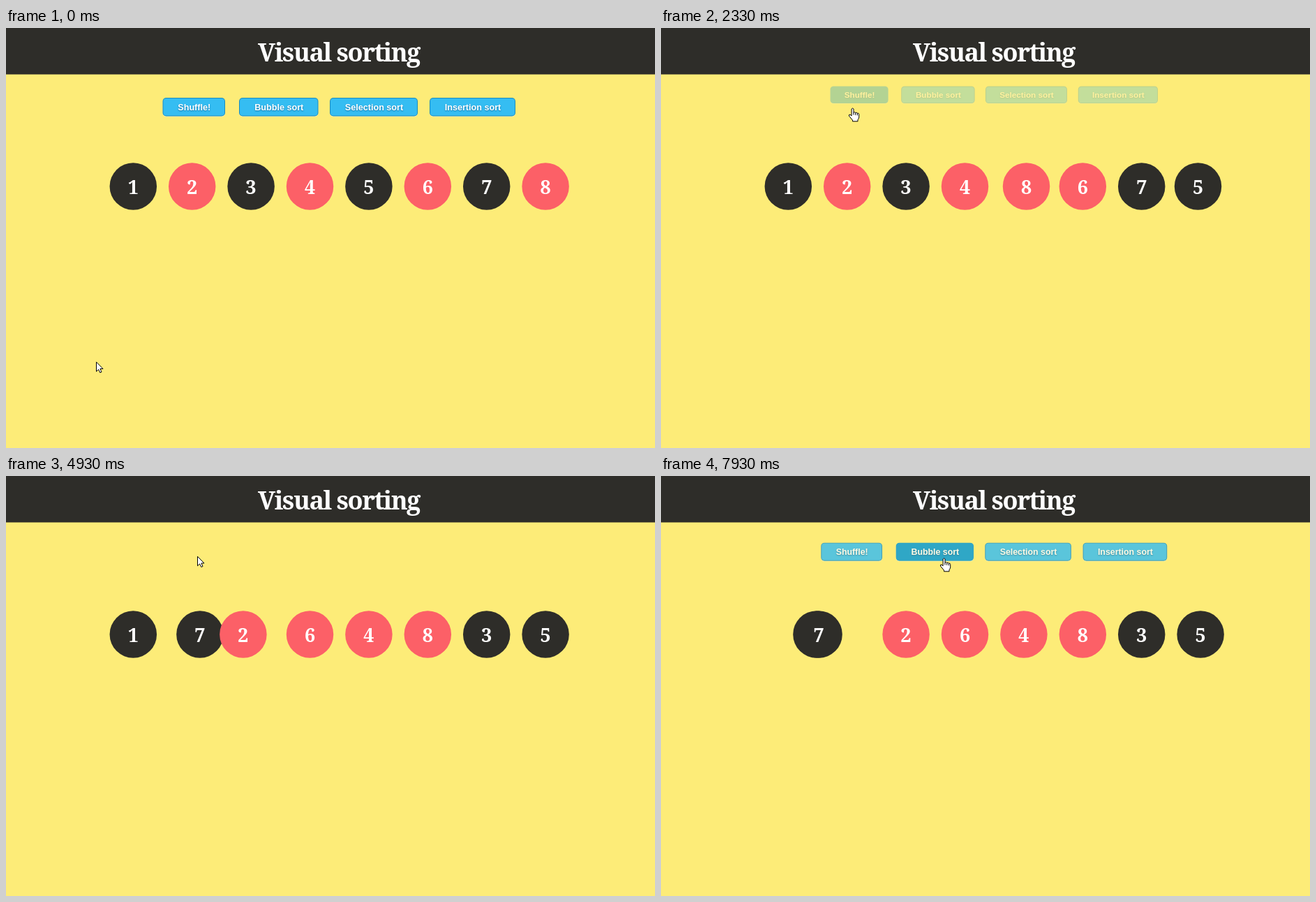
Recreate the animation shown at these times as an HTML page with a canvas. Size 930x602 px, loop 8000 ms.

```html
<!DOCTYPE html>
<html lang="en">
<head>
<meta charset="utf-8">
<title>Visual sorting</title>
<style>
html, body { margin: 0; width: 100%; height: 100%; overflow: hidden; background: #fdec78; }
canvas { display: block; }
</style>
</head>
<body>
<canvas id="stage" width="930" height="602"></canvas>
<script>
const W = 930, H = 602, LOOP = 8000, FPS = 15;
const DARK = '#2e2d29', RED = '#fc6067', YELLOW = '#fdec78';
const ctx = document.getElementById('stage').getContext('2d');
const layer = document.createElement('canvas');
layer.width = W;
layer.height = H;
const lctx = layer.getContext('2d');

// label, left, right
const BUTTONS = [
  ['Shuffle!', 224.5, 314],
  ['Bubble sort', 334, 447.5],
  ['Selection sort', 464, 590],
  ['Insertion sort', 607, 730]
];
const TOP = 100, BOTTOM = 126.5;

const SHUFFLE = 1911, STEP = 547, SHUFFLE_END = 5760, BUBBLE = 7782;
const SWAP_MS = 500, FADE_MS = 1000;

// start time and the two slots that trade places
const SWAPS = [[0, 4, 7], [1, 2, 6], [2, 4, 5], [3, 3, 4], [5, 1, 2], [6, 0, 1]]
  .map(([n, a, b]) => [SHUFFLE + n * STEP, a, b])
  .concat([[BUBBLE, 0, 1]]);

// time, x, y of the pointer
const MOVES = [
  [
    [30, 129, 478], [200, 115, 447], [430, 65, 335], [650, 66, 240], [870, 110, 165],
    [1000, 187, 147], [1130, 244, 137], [1300, 266, 124], [1470, 274, 114.5]
  ],
  [[6690, 274, 114.5], [6880, 303, 145], [7030, 345, 156], [7150, 389, 138], [7270, 405, 117.5]]
];

const clamp = v => Math.max(0, Math.min(1, v));
const slotX = i => 182.3 + 84.4 * i;

// CSS "ease": cubic-bezier(.25, .1, .25, 1)
function ease(x) {
  x = clamp(x);
  const bez = (a, b, u) => 3 * a * u * (1 - u) ** 2 + 3 * b * u * u * (1 - u) + u ** 3;
  let lo = 0, hi = 1;
  for (let k = 0; k < 24; k++) {
    const mid = (lo + hi) / 2;
    if (bez(.25, .25, mid) < x) lo = mid; else hi = mid;
  }
  return bez(.1, 1, lo);
}

// Smooth curve through timed points, at rest on both ends
function along(pts, t) {
  const last = pts.length - 1;
  if (t <= pts[0][0]) return pts[0].slice(1);
  if (t >= pts[last][0]) return pts[last].slice(1);
  const i = pts.findIndex(p => p[0] > t) - 1;
  const slope = (k, d) => k === 0 || k === last ? 0 :
    (pts[k + 1][d] - pts[k - 1][d]) / (pts[k + 1][0] - pts[k - 1][0]);
  const a = pts[i], b = pts[i + 1], dt = b[0] - a[0], u = (t - a[0]) / dt;
  const v = 1 - u;
  return [1, 2].map(d =>
    a[d] * v * v * (1 + 2 * u) + slope(i, d) * dt * u * v * v +
    b[d] * u * u * (3 - 2 * u) - slope(i + 1, d) * dt * u * u * v);
}

function drawHeader() {
  ctx.fillStyle = YELLOW;
  ctx.fillRect(0, 0, W, H);
  ctx.fillStyle = DARK;
  ctx.fillRect(0, 0, W, 66.5);
  ctx.fillStyle = '#fff';
  ctx.font = 'bold 36px "Noto Serif", serif';
  ctx.letterSpacing = '-1.5px';
  ctx.textAlign = 'center';
  ctx.fillText('Visual sorting', 477, 47.5);
  ctx.letterSpacing = '0px';
}

function drawButtons(p, hot) {
  if (p >= 1) return;
  const c = lctx;
  c.clearRect(0, 0, W, H);
  c.save();
  c.translate(477.2, 113.3 - 24.5 * p);
  c.scale(1 - .1 * p, 1 - .1 * p);
  c.translate(-477.2, -113.3);
  c.font = 'bold 12.6px "Liberation Sans", Arial, sans-serif';
  c.textAlign = 'center';
  BUTTONS.forEach(([label, left, right], i) => {
    const box = (inset, dy = 0) => {
      c.beginPath();
      c.roundRect(left + inset, TOP + inset + dy, right - left - 2 * inset, BOTTOM - TOP - 2 * inset, 5 - inset);
    };
    box(0, 1);
    c.fillStyle = 'rgba(255,255,255,.4)';
    c.fill();
    box(0);
    c.fillStyle = i === hot ? '#0394d4' : '#1c8cbd';
    c.fill();
    box(1);
    c.fillStyle = i === hot ? '#0098d8' : '#35bdf2';
    c.fill();
    c.shadowColor = 'rgba(0,70,120,.6)';
    c.shadowOffsetY = 1;
    c.shadowBlur = 2;
    c.fillStyle = '#fff';
    c.fillText(label, (left + right) / 2 + .5, 118);
    c.shadowColor = 'transparent';
  });
  c.restore();
  ctx.globalAlpha = 1 - p;
  ctx.drawImage(layer, 0, 0);
  ctx.globalAlpha = 1;
}

function drawBalls(t) {
  const order = [1, 2, 3, 4, 5, 6, 7, 8];
  const xs = order.map((n, i) => slotX(i));
  for (const [start, a, b] of SWAPS) {
    if (t < start) break;
    [order[a], order[b]] = [order[b], order[a]];
    const shift = (slotX(b) - slotX(a)) * (1 - ease((t - start) / SWAP_MS));
    xs[a] = slotX(a) + shift;
    xs[b] = slotX(b) - shift;
  }
  ctx.font = 'bold 27px "Noto Serif", serif';
  order.forEach((n, i) => {
    ctx.fillStyle = n % 2 ? DARK : RED;
    ctx.beginPath();
    ctx.arc(xs[i], 227, 33.75, 0, 7);
    ctx.fill();
    ctx.fillStyle = '#fff';
    ctx.fillText(n, xs[i], 237.5);
  });
}

const ARROW = new Path2D('M.5 .8V14.3L3.6 11.4L5.8 16L8 15L5.9 10.5H10Z');
const HAND = new Path2D('M-.9 1.6Q.6 -.6 2 1.6V6.6Q3.6 5.4 4.8 7Q6.4 6 7.4 7.7Q9.4 7 9.7 9.2' +
  'V13.4Q9.4 15.5 8 17V19.3H.5V17.6L-4.5 11.6Q-5.2 9.2 -3 9.6L-.9 11.4Z');
const KNUCKLES = new Path2D('M2 6.5V10M4.8 7V10.4M7.4 7.7V10.8');

function drawPointer(x, y, hand) {
  ctx.save();
  ctx.translate(x, y);
  ctx.fillStyle = '#fff';
  ctx.strokeStyle = '#000';
  ctx.lineWidth = 1;
  ctx.lineJoin = 'round';
  const shape = hand ? HAND : ARROW;
  ctx.fill(shape);
  ctx.stroke(shape);
  if (hand) ctx.stroke(KNUCKLES);
  ctx.restore();
}

function draw(t) {
  const [x, y] = along(MOVES[t < 6000 ? 0 : 1], t);
  const hot = BUTTONS.findIndex(([, left, right]) => x > left && x < right && y > TOP && y < BOTTOM);
  const fadeStart = t < SHUFFLE_END ? SHUFFLE : BUBBLE;
  const away = t > 2400 && t < SHUFFLE_END;
  drawHeader();
  drawButtons(ease((t - fadeStart) / FADE_MS), hot);
  drawBalls(t);
  drawPointer(x, y, hot >= 0 && !away);
}

const begin = performance.now();
function tick() {
  const t = (performance.now() - begin) % LOOP;
  draw(Math.floor((t + 6) * FPS / 1000) * 1000 / FPS % LOOP);
  requestAnimationFrame(tick);
}
tick();
</script>
</body>
</html>
```
